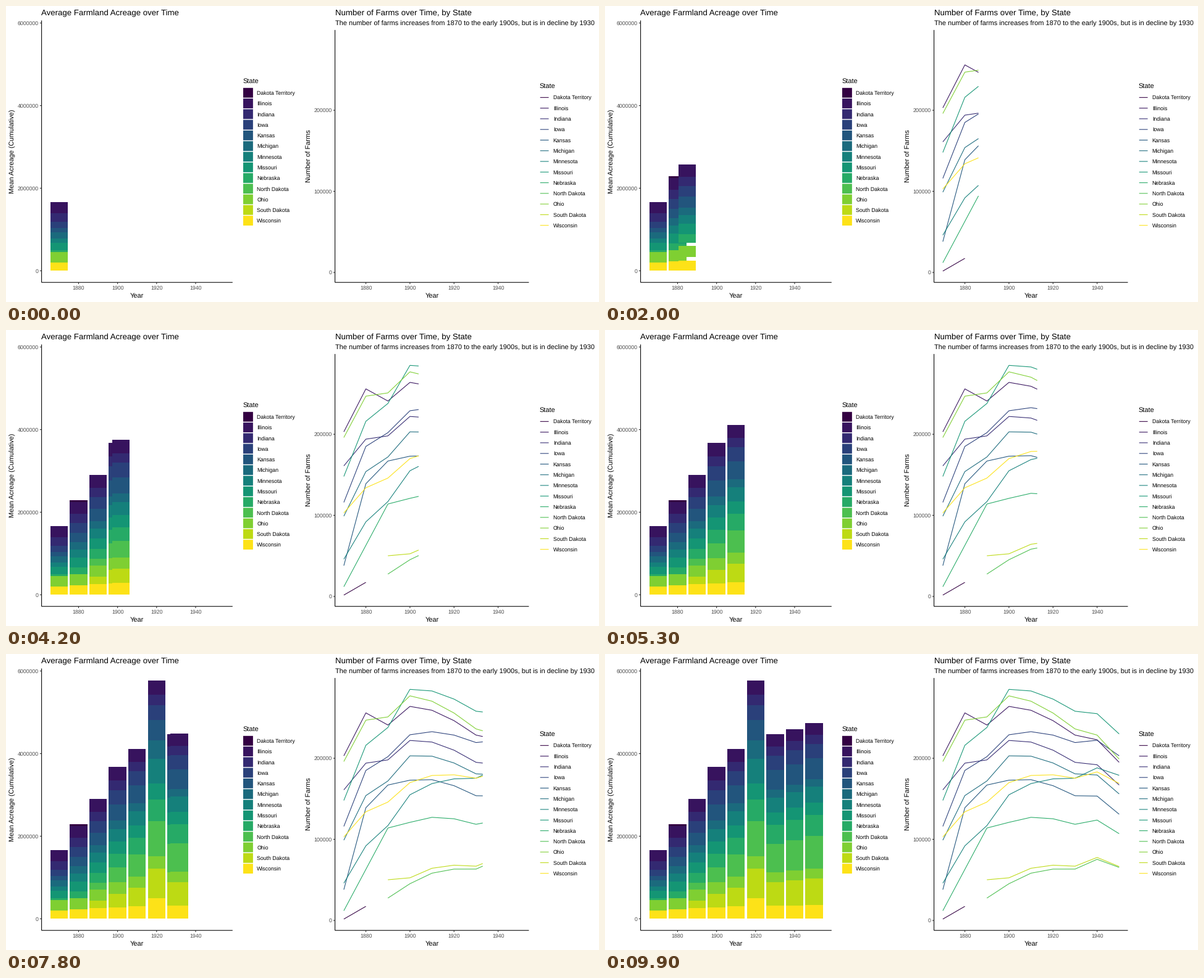
Write a matplotlib script that moves like this. It is 960x480 px and loops after 10 s.

```python
import numpy as np
import matplotlib.pyplot as plt
from matplotlib.animation import FuncAnimation
from matplotlib.patches import Rectangle

plt.rcParams.update({
    "font.family": "Liberation Sans",
    "text.hinting": "none",
    "toolbar": "None",
})

W, H, DPI = 960, 480, 80
PT = 72 / DPI            # points per pixel
LINE = 1.07 * PT
FRAMES, INTERVAL = 100, 100
HOLD, MOVE = 6, 6        # frames a bar rests, then slides to the next decade

YEARS = np.arange(1870, 1951, 10)
DECADES = np.arange(len(YEARS))
# how far acreage has come by each census: 0 at 1870, 1 at 1900, 2 at 1950
PACE = np.array([0, 0.446, 0.665, 1, 1.41, 1.6, 1.74, 1.865, 2])
# shared bow of the farm counts between 1900 and 1950, in thousands
SWING = np.array([0, 0, 0, 0, 9, 10, 6, 14, 0])

# name, first census, farms at 1870/80/90/1900/50, acres at 1870/1900/50
# (both in thousands), jump of the acreage in 1920
STATES = [
    ("Dakota Territory", 0, (1.7, 17.4), (0, 38), 1),
    ("Illinois", 0, (203, 256, 241, 264, 195), (265, 325, 290), 1.13),
    ("Indiana", 0, (161, 194, 198, 222, 167), (205, 235, 220), 1.12),
    ("Iowa", 0, (116, 185, 202, 229, 203), (157, 345, 335), 1.05),
    ("Kansas", 0, (38, 139, 167, 173, 131), (105, 390, 507), 1.07),
    ("Michigan", 0, (99, 154, 172, 203, 156), (155, 208, 180), 2.34),
    ("Minnesota", 0, (46, 92, 117, 155, 179), (90, 302, 388), 1.69),
    ("Missouri", 0, (148, 216, 238, 285, 230), (190, 298, 302), 1.29),
    ("Nebraska", 0, (12, 63, 114, 121, 107), (48, 325, 510), 1.21),
    ("North Dakota", 2, (27.6, 45.3, 65.4), (165, 370, 790), 1.37),
    ("Ohio", 0, (196, 247, 251, 277, 199), (247, 275, 241), 1.18),
    ("South Dakota", 2, (50.2, 52.6, 66.5), (190, 325, 645), 1.38),
    ("Wisconsin", 0, (103, 134, 146, 170, 169), (200, 280, 332), 1.60),
]
# viridis as a darker 1.8-gamma display shows it
COLORS = plt.get_cmap("viridis")(np.linspace(0, 1, len(STATES)))[:, :3] ** 1.22


def through(pos, keys, values):
    return np.interp(pos, pos[keys], values, left=np.nan, right=np.nan)


def histories(first, farms, acres, jump):
    """Farm counts and acreage at every census; nan where the state is missing."""
    keys = [d for d in (0, 1, 2, 3, 8) if d >= first][:len(farms)]
    count = through(DECADES, keys, farms) + SWING
    area = through(PACE, keys if len(keys) == len(acres) else [0, 3, 8], acres)
    area[YEARS == 1920] *= jump
    return count, area


FARMS, ACRES = (np.array(rows) for rows in
                zip(*(histories(*state[1:]) for state in STATES)))

fig = plt.figure(figsize=(W / DPI, H / DPI), dpi=DPI, facecolor="white")
ax = fig.add_axes([0, 0, 1, 1])
ax.set(xlim=(0, W), ylim=(H, 0))
ax.axis("off")


def text(x, y, s, size, **kw):
    ax.text(x, y, s, fontsize=size * PT, va="baseline", **kw)


def line(xs, ys, color="black", **kw):
    return ax.plot(xs, ys, color=color, lw=LINE, solid_capstyle="butt",
                   solid_joinstyle="round", snap=False, **kw)[0]


def panel(left, right, top, bottom, edge, x_of, y_of, y_ticks, y_title):
    """Axis lines, ticks, tick labels and axis titles."""
    for year in range(1880, 1941, 20):
        line([x_of(year)] * 2, [bottom, bottom + 2.75], "#333333")
        text(x_of(year), 459.9, str(year), 8.8, ha="center", color="#4D4D4D")
    for v in y_ticks:
        y = y_of(v)
        line([left - 2.75, left], [y, y], "#333333")
        text(left - 5, y + 3.15, str(v * 1000), 8.8, ha="right", color="#4D4D4D")
    line([left, left], [top, bottom])
    line([left, right], [bottom, bottom])
    text((left + right) / 2, 472.5, "Year", 11, ha="center")
    text(edge + 14.2, (top + bottom) / 2, y_title, 11, ha="center",
         rotation=90, rotation_mode="anchor")


def legend(x, top, filled):
    text(x, top - 6.8, "State", 11)
    key = 17.28
    side = key - 1.42
    for i, (state, color) in enumerate(zip(STATES, COLORS)):
        y = top + key * (i + 0.5)
        if filled:
            ax.add_patch(Rectangle((x + 0.71, y - side / 2), side, side,
                                   fc=color, lw=0, snap=False))
        else:
            line([x + 0.1 * key, x + 0.9 * key], [y, y], color)
        text(x + key + 5.5, y + 3.15, state[0], 8.8)


def bar_x(year):
    return 85.9 + (year - 1870) * 3.158


def bar_y(acres):
    return 429.4 - acres * 0.06697


def farm_x(year):
    return 546.9 + (year - 1870) * 3.568


def farm_y(farms):
    return 432.1 - farms * 1.315


text(57.3, 15, "Average Farmland Acreage over Time", 13.2)
panel(57.6, 366.8, 23.5, 448.2, 0, bar_x, bar_y,
      range(0, 6001, 2000), "Mean Acreage (Cumulative)")
legend(383.3, 132.1, True)

text(532.6, 15, "Number of Farms over Time, by State", 13.2)
text(532.6, 31.7, "The number of farms increases from 1870 to the early 1900s, "
     "but is in decline by 1930", 11)
panel(532.6, 846.5, 38.9, 448.2, 480, farm_x, farm_y,
      range(0, 201, 100), "Number of Farms")
legend(863, 139.7, False)

# stacked from the last state up
tops = np.cumsum(np.nan_to_num(ACRES)[::-1], axis=0)[::-1]
tops[np.isnan(ACRES)] = np.nan
bases = tops - ACRES
BAR_W = 9 * 3.158


def make_stack(z):
    return [ax.add_patch(Rectangle((0, 0), BAR_W, 0, fc=c, lw=0, zorder=z))
            for c in COLORS]


def hide(stack):
    for rect in stack:
        rect.set_visible(False)


def place(stack, year, top, base):
    for rect, t, b in zip(stack, top, base):
        rect.set_visible(bool(t > b))
        if t > b:
            rect.set_xy((bar_x(year) - BAR_W / 2, bar_y(t)))
            rect.set_height(bar_y(b) - bar_y(t))


def between(table, k, p):
    return table[:, k] + (table[:, k + 1] - table[:, k]) * p


fixed = [make_stack(3) for _ in YEARS]
slider = make_stack(4)
curves = [line([], [], c, zorder=5) for c in COLORS]


def draw_bars(i):
    k, step = divmod(i, HOLD + MOVE)
    p = max(0, step - HOLD + 1) / MOVE
    if p == 1:
        k, p = k + 1, 0
    for j, stack in enumerate(fixed):
        if j <= k:
            place(stack, YEARS[j], tops[:, j], bases[:, j])
        else:
            hide(stack)
    if p:
        # states missing at either end stay hidden while sliding
        place(slider, YEARS[k] + 10 * p, between(tops, k, p), between(bases, k, p))
    else:
        hide(slider)


def draw_curves(i):
    now = 1870 + 80 * i / (FRAMES - 1)
    for curve, row in zip(curves, FARMS):
        known = ~np.isnan(row)
        years, farms = YEARS[known], row[known]
        end = min(now, years[-1])
        past = years < end
        xs = ys = np.array([])
        if past.any():
            xs = np.append(years[past], end)
            ys = np.append(farms[past], np.interp(end, years, farms))
        curve.set_data(farm_x(xs), farm_y(ys))


def draw(i):
    draw_bars(i)
    draw_curves(i)
    return []


anim = FuncAnimation(fig, draw, frames=FRAMES, interval=INTERVAL,
                     init_func=lambda: draw(0), repeat=True, repeat_delay=0,
                     blit=False)
plt.show()
```
